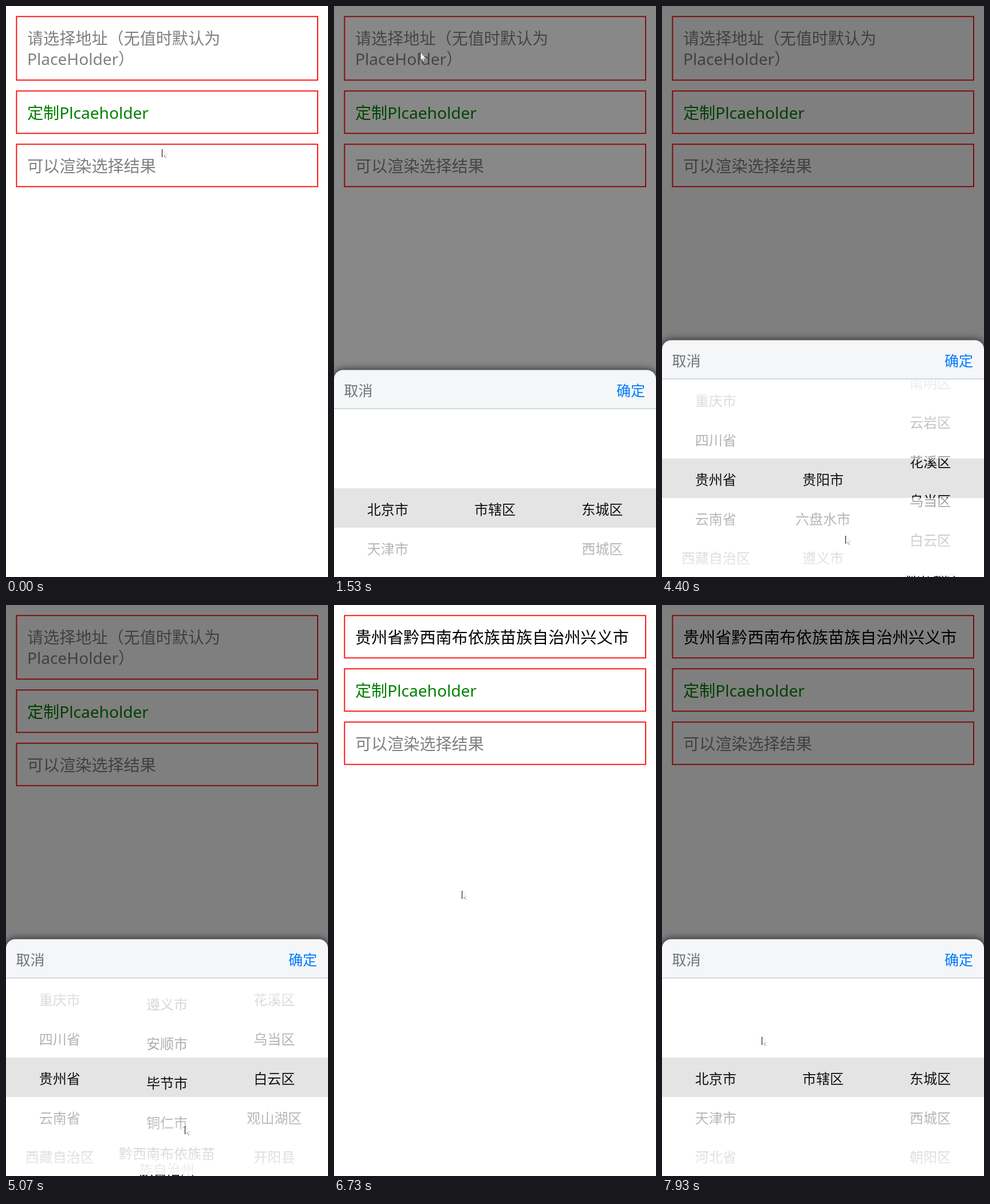
These frames come from a looping animation (562x997 px, 8000 ms). An HTML page with a canvas:

```html
<!DOCTYPE html>
<html lang="zh-CN">
<head>
<meta charset="utf-8">
<style>
html, body { margin: 0; width: 562px; height: 997px; overflow: hidden; background: #fff; }
canvas { display: block; }
</style>
</head>
<body>
<canvas id="stage" width="562" height="997"></canvas>
<script>
const W = 562, H = 997, LOOP = 8000, STEP = 200 / 3;
const ctx = document.getElementById('stage').getContext('2d');
const FONT = '"Noto Sans", "Noto Sans CJK SC", sans-serif';
const SHEET_TOP = 583.5, LIST_TOP = 652, BAND_TOP = 790, BAND_END = 859, ROW = 68.8;

const provinces = ('北京市 天津市 河北省 山西省 内蒙古自治区 辽宁省 吉林省 黑龙江省 上海市 江苏省 浙江省 ' +
  '安徽省 福建省 江西省 山东省 河南省 湖北省 湖南省 广东省 广西壮族自治区 海南省 重庆市 四川省 贵州省 ' +
  '云南省 西藏自治区 陕西省 甘肃省 青海省 宁夏回族自治区 新疆维吾尔自治区').split(' ');
const cities = ('贵阳市 六盘水市 遵义市 安顺市 毕节市 铜仁市 黔西南布依族苗族自治州 ' +
  '黔东南苗族侗族自治州 黔南布依族苗族自治州').split(' ');
const cityOnly = ['市辖区'];
const beijing = '东城区 西城区 朝阳区 丰台区 石景山区'.split(' ');
const guiyang = '南明区 云岩区 花溪区 乌当区 白云区 观山湖区 开阳县 息烽县 修文县 清镇市'.split(' ');
const qianxinan = '兴义市 兴仁市 普安县 晴隆县 贞丰县 望谟县 册亨县 安龙县'.split(' ');

const phase = (t, start, length) => Math.min(1, Math.max(0, (t - start) / length));
const easeOut = (x, power = 3) => 1 - (1 - x) ** power;
const smooth = x => x * x * (3 - 2 * x);

// Places the pointer travels to: start, duration, x, y.
const moves = [
  [133, 934, 150, 81], [1533, 734, 122, 810], [3867, 200, 465, 800], [4133, 267, 320, 925],
  [4467, 800, 310, 800], [5267, 466, 523, 620], [6333, 400, 223, 499], [6733, 467, 180, 150],
  [7533, 400, 174, 754]
];

function cursorAt(t) {
  let x = 272, y = 250;
  for (const [start, length, toX, toY] of moves) {
    const p = smooth(phase(t, start, length));
    x += (toX - x) * p;
    y += (toY - y) * p;
  }
  // Flicking the wheels swings the pointer up and down.
  const swings = 2 * phase(t, 2267, 1600) + phase(t, 4467, 800);
  return [x, y - 90 * Math.sin(2 * Math.PI * swings)];
}

function columns(t) {
  if (t > 7000) return [[provinces, 0], [cityOnly, 0], [beijing, 0]];
  const province = [provinces, 29 * easeOut(phase(t, 2267, 867), 2) - 6 * smooth(phase(t, 3200, 867))];
  if (t < 4060) return [province, [cityOnly, 0], [beijing, 0]];
  const district = t < 5660
    ? [guiyang, 4 * easeOut(phase(t, 4067, 880), 2)]
    : [qianxinan, 4 * (1 - easeOut(phase(t, 5667, 200)))];
  return [province, [cities, 6 * smooth(phase(t, 4467, 1000))], district];
}

function text(str, x, y, size, color, align = 'left') {
  ctx.font = `${size}px ${FONT}`;
  ctx.fillStyle = color;
  ctx.textAlign = align;
  ctx.fillText(str, x, y + size * 0.38);
}

function drawField(y, lines, color) {
  const h = 39 + 37 * lines.length;
  ctx.strokeStyle = '#f00';
  ctx.lineWidth = 1.8;
  ctx.strokeRect(18.4, y + 1.4, 525.5, h - 2);
  lines.forEach((line, i) => text(line, 37, y + 39.4 + 36.4 * i, 28.1, color));
  return y + h + 17;
}

function drawPage(t) {
  const chosen = t >= 6395;
  let y = 17;
  y = drawField(y, chosen ? ['贵州省黔西南布依族苗族自治州兴义市'] : ['请选择地址（无值时默认为', 'PlaceHolder）'],
    chosen ? '#000' : '#808080');
  y = drawField(y, ['定制Plcaeholder'], '#008000');
  drawField(y, ['可以渲染选择结果'], '#808080');
}

function drawColumn(items, pos, col) {
  const x = W * (col + 0.5) / 3;
  items.forEach((item, i) => {
    const y = 826.7 + (i - pos) * ROW;
    if (y < 600 || y > 1050) return;
    const lines = item.match(/.{1,7}/g);
    lines.forEach((line, j) => text(line, x, y + (j - (lines.length - 1) / 2) * 28, 24, '#111', 'center'));
  });
}

function fade(top, bottom, from, to) {
  const g = ctx.createLinearGradient(0, top, 0, bottom);
  g.addColorStop(0, `rgba(255,255,255,${from})`);
  g.addColorStop(1, `rgba(255,255,255,${to})`);
  ctx.fillStyle = g;
  ctx.fillRect(0, top, W, bottom - top);
}

function drawSheet(t, open) {
  ctx.save();
  ctx.translate(0, (H - SHEET_TOP) * (1 - open));
  ctx.save();
  ctx.shadowColor = 'rgba(0,0,0,.8)';
  ctx.shadowBlur = 14;
  ctx.fillStyle = '#f4f6f8';
  ctx.beginPath();
  ctx.roundRect(0, SHEET_TOP, W, 440, [16, 16, 0, 0]);
  ctx.fill();
  ctx.restore();
  text('取消', 17.5, 619.3, 25, '#6c757d');
  text('确定', 543, 619.3, 25, '#007bff', 'right');

  ctx.fillStyle = '#fff';
  ctx.fillRect(0, LIST_TOP, W, 400);
  ctx.fillStyle = '#c9cfd4';
  ctx.fillRect(0, LIST_TOP - 1.5, W, 1.5);
  ctx.fillStyle = '#e4e4e4';
  ctx.fillRect(0, BAND_TOP, W, BAND_END - BAND_TOP);
  ctx.beginPath();
  ctx.rect(0, LIST_TOP, W, H - LIST_TOP);
  ctx.clip();
  columns(t).forEach(([items, pos], col) => drawColumn(items, pos, col));
  fade(LIST_TOP, BAND_TOP, 0.95, 0.6);
  fade(BAND_END, 995, 0.6, 0.95);
  ctx.restore();
}

const arrow = new Path2D('M.5 .5V13.5L3.5 11L5.5 15.5L7.5 14.5L5.5 10.5L9.5 10Z');

function drawCursor(x, y) {
  ctx.save();
  ctx.translate(Math.round(x), Math.round(y));
  ctx.fillStyle = '#fff';
  ctx.strokeStyle = '#ccc';
  ctx.lineWidth = 0.8;
  ctx.fill(arrow);
  ctx.stroke(arrow);
  ctx.fillStyle = '#000';
  ctx.fillRect(0, 0, 1, 14);
  ctx.fillStyle = '#666';
  ctx.fillRect(4, 11, 1, 2);
  ctx.fillRect(6, 14, 1.5, 1);
  ctx.restore();
}

function draw(now) {
  // The screen updates fifteen times per second.
  const t = Math.floor((now % LOOP + 4) / STEP) * STEP;
  const opening = phase(t, t < 7000 ? 1400 : 7467, 267);
  const closing = t < 7000 ? easeOut(phase(t, 6333, 267)) : 0;
  const open = easeOut(opening) * (1 - closing);
  ctx.fillStyle = '#fff';
  ctx.fillRect(0, 0, W, H);
  drawPage(t);
  if (open > 0.001) {
    ctx.fillStyle = `rgba(0,0,0,${0.5 * easeOut(opening, 4) * (1 - closing)})`;
    ctx.fillRect(0, 0, W, H);
    drawSheet(t, open);
  }
  drawCursor(...cursorAt(t));
}

const start = performance.now();
function tick() {
  draw(performance.now() - start);
  requestAnimationFrame(tick);
}
tick();
</script>
</body>
</html>
```
